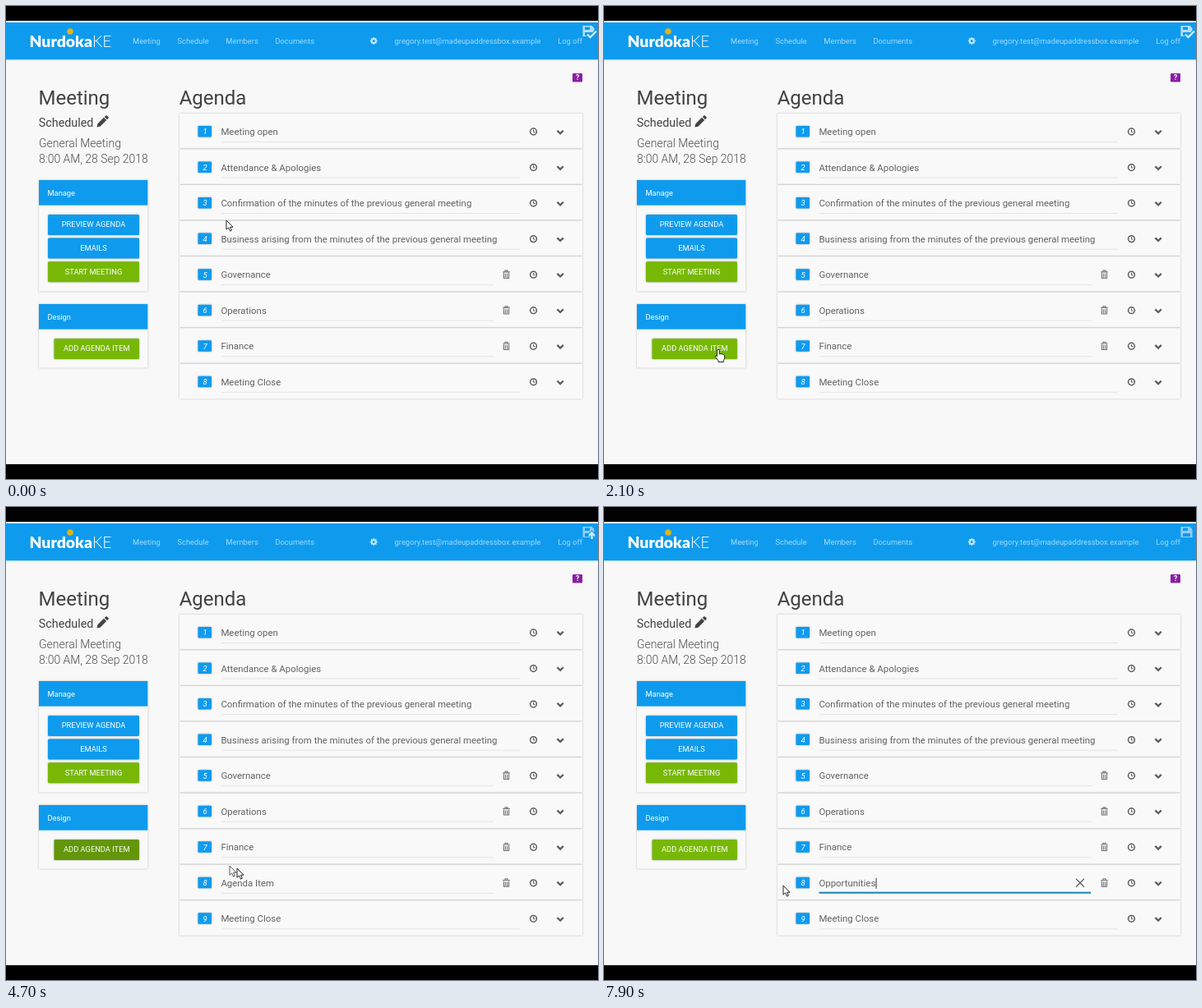
Write an HTML page that moves like this. It is 720 px wide and 576 px high and loops after 8000 ms.

```html
<!DOCTYPE html>
<html lang="en">
<head>
<meta charset="utf-8">
<style>
  html, body { margin: 0; width: 100%; height: 100%; overflow: hidden; background: #000; }
  svg { display: block; width: 720px; height: 576px; font-family: Roboto, sans-serif; }
  text { white-space: pre; }
  .nav { font-size: 9.36px; fill: #a3dafa; }
  .small { font-size: 9.3px; fill: #fff; }
  .item { font-size: 11.43px; fill: #626262; }
  .badge { font-size: 9.5px; font-style: italic; fill: #fff; text-anchor: middle; }
  .card { fill: #f9f9f9; filter: drop-shadow(0 .7px .8px rgba(0, 0, 0, .25)); }
  .raised { filter: drop-shadow(0 .8px .9px rgba(0, 0, 0, .32)); }
  .line { fill: none; stroke: #5c5c5c; stroke-width: 1.5; }
</style>
</head>
<body>
<svg id="stage" viewBox="0 0 720 576"></svg>
<script>
const BLUE = '#0e9bee', GREEN = '#77b806', DARK_GREEN = '#63960a';
const LOOP = 8000, PITCH = 43.54, FIRST_ROW = 153;
const TYPED = 'Opportunities';

const rect = (x, y, w, h, fill, extra = '') =>
  `<rect x="${x}" y="${y}" width="${w}" height="${h}" fill="${fill}" ${extra}/>`;
const text = (x, y, content, extra) => `<text x="${x}" y="${y}" ${extra}>${content}</text>`;
const heading = (x, y, size, content, weight = 400, fill = '#424242') =>
  text(x, y, content, `font-size="${size}" font-weight="${weight}" fill="${fill}"`);
const rowY = i => FIRST_ROW + PITCH * i;

const button = (x, y, w, label, fill, id = '') =>
  rect(x, y, w, 25, fill, `rx="1.5" class="raised" ${id}`) +
  text(x + w / 2, y + 15.4, label, 'class="small" text-anchor="middle"');

const panel = (y, h, title) =>
  rect(40, y, 132.3, h, '', 'class="card"') + rect(40, y, 132.3, 30.7, BLUE) +
  text(50.5, y + 18.6, title, 'class="small"');

const bin = '<path class="line" d="M604.300 -3.300h8.400M607 -3.800v-1.200h3v1.200M605.400 -2.300v6.600h6.200v-6.600M607.400 -1.500v5M609.600 -1.500v5" style="stroke:#747474;stroke-width:1.1"/>';

// One agenda row, drawn around its own centre line.
function row(number, label, removable, ids = ['', '', '']) {
  return `<g ${ids[0]} transform="translate(0 ${rowY(number - 1)})">
    ${rect(211, -22, 490, 42.3, '', 'class="card"')}
    ${rect(262, 12, removable ? 331 : 363, 1, '#e4e4e4')}
    ${rect(233.5, -7, 16.5, 13.5, BLUE, 'rx="1" class="raised"')}
    ${text(242, 3.4, number, `class="badge" ${ids[1]}`)}
    ${ids[2] ? '<g id="field"></g>' : ''}
    ${text(261.4, 4.1, label, `class="item" ${ids[2]}`)}
    ${removable ? bin : ''}
    <circle class="line" cx="641.5" cy="0" r="3.9"/>
    <path class="line" d="M641.5 -2.3v2.7h2" style="stroke-width:1"/>
    <path class="line" d="M670.4 -1.3l3.7 3.6l3.7 -3.6" style="stroke-width:2.3"/>
  </g>`;
}

const items = ['Meeting open', 'Attendance &amp; Apologies',
  'Confirmation of the minutes of the previous general meeting',
  'Business arising from the minutes of the previous general meeting',
  'Governance', 'Operations', 'Finance'];

const gear = Array.from({ length: 8 }, (_, i) =>
  `<rect x="-.9" y="-4.4" width="1.8" height="2.5" transform="rotate(${i * 45})"/>`).join('');

const stage = document.getElementById('stage');
stage.innerHTML = `
  ${rect(0, 18, 720, 540, '#f8f8f8')}
  ${rect(0, 20, 720, 45.5, BLUE)}
  ${rect(0, 65.5, 720, 1, '#dbe9f2')}
  <circle cx="78" cy="31" r="3.8" fill="#e2b318"/>
  <text x="28.5" y="50" font-family="Lato, sans-serif" font-size="19.4" font-weight="900" fill="#fff">Nurdoka<tspan
    font-weight="300">KE</tspan></text>
  ${[[154, 'Meeting'], [208.5, 'Schedule'], [267.3, 'Members'], [327.4, 'Documents'],
    [472.6, 'gregory.test@madeupaddressbox.example'], [671.2, 'Log off']]
    .map(([x, label]) => text(x, 46.3, label, 'class="nav"')).join('')}
  <g transform="translate(447.3 42.5)" fill="#c3e7fc">${gear}
    <circle r="2.4" fill="none" stroke="#c3e7fc" stroke-width="1.8"/></g>
  <path id="disk" fill-rule="evenodd" d="M701.500 24h11l3 3v10h-14zM704 25.500v3.500h6v-3.500zM704 32v4h9v-4z"/>
  <path id="diskEdge" fill="none" stroke="${BLUE}" stroke-width="4.5"/>
  <path id="diskMark" fill="none" stroke="#d3ecfc" stroke-width="2.3"/>
  ${rect(689, 82, 12, 10.5, '#8a1fa5', 'rx="1"')}
  ${text(695, 90.2, '?', 'font-size="8.5" font-weight="700" fill="#fff" text-anchor="middle"')}
  ${heading(39.5, 120, 24, 'Meeting')}
  ${heading(210.7, 120, 24, 'Agenda')}
  ${heading(39.8, 147, 14.3, 'Scheduled')}
  <path d="M110.500 147.500l.8-4l7.700-7.700l3.200 3.200l-7.700 7.700zM119.800 135l1.500-1.500q.8-.6 1.600 0l1.600 1.600q.6.8 0 1.600l-1.500 1.500z" fill="#424242"/>
  ${heading(40, 172.3, 14, 'General Meeting', 300, '#505050')}
  ${heading(40, 191.2, 13.95, '8:00 AM, 28 Sep 2018', 300, '#505050')}
  ${panel(212, 135.5, 'Manage')}
  ${button(51, 254, 111, 'PREVIEW AGENDA', BLUE)}
  ${button(51, 282.5, 111, 'EMAILS', BLUE)}
  ${button(51, 311.2, 111, 'START MEETING', GREEN)}
  ${panel(363, 77.5, 'Design')}
  ${button(58.5, 405, 103.5, 'ADD AGENDA ITEM', GREEN, 'id="add"')}
  <circle id="ripple" cx="110.3" cy="417.3" r="11" fill="#000" opacity=".35"/>
  ${items.map((label, i) => row(i + 1, label, i > 3)).join('')}
  ${row(8, 'Agenda Item', true, ['id="added"', '', 'id="label"'])}
  ${row(9, 'Meeting Close', false, ['id="last"', 'id="lastNumber"', ''])}
  ${['ghost', 'cursor'].map(id =>
    `<path id="${id}" fill="#fff" stroke="#222" stroke-width="1" stroke-linejoin="round"/>`).join('')}`;

const $ = id => document.getElementById(id);
const set = (id, name, value) => $(id).setAttribute(name, value);
const show = (id, visible) => set(id, 'visibility', visible ? 'visible' : 'hidden');

const ARROW = 'M0 0v11.200l2.600-2.300l1.900 4.200l1.900-.9l-1.900-4h3.500z';
const HAND = 'M-1.500 .8q1.500-1.500 2.800 0v5l1.800-.3l2 .5l1.700.6l.8 1.200v3.500l-1.200 2.200v2h-6.400v-1.700l-3.600-4.600q-.2-1.600 1.500-1.300l.6.7z';

// [time, x, y] of the pointer tip
const path = [[0, 268, 261], [300, 268, 261], [700, 226, 300], [1400, 142, 390], [1500, 137, 401],
  [1800, 139, 418], [2900, 139, 418], [3600, 238, 434], [3800, 238, 434], [3900, 241, 435],
  [4400, 260, 436], [4600, 272, 437], [4700, 281, 440], [5100, 289, 463], [6200, 289, 463],
  [6800, 218, 461], [LOOP, 218, 461]];

function pointerAt(t) {
  const next = Math.max(1, path.findIndex(p => p[0] >= t));
  const [t0, x0, y0] = path[next - 1], [t1, x1, y1] = path[next];
  const k = Math.max(0, (t - t0) / (t1 - t0));
  return [x0 + (x1 - x0) * k, y0 + (y1 - y0) * k];
}

function drawPointer(t) {
  const [x, y] = pointerAt(t), [gx, gy] = pointerAt(Math.max(0, t - 100));
  const shape = t >= 1700 && t < 4300 ? HAND : ARROW;
  [['cursor', x, y], ['ghost', gx, gy]].forEach(([id, px, py]) => {
    set(id, 'd', shape);
    set(id, 'transform', `translate(${px} ${py})`);
  });
  set('ghost', 'opacity', Math.hypot(x - gx, y - gy) > 1 ? .75 : 0);
}

function drawField(t) {
  const focused = t >= 5200, word = t >= 5500 && t < 6200, all = t >= 6200 && t < 6500;
  const count = Math.max(0, Math.min(TYPED.length, Math.floor((t - 6400) / 95)));
  const label = $('label');
  const part = (content, selected) => `<tspan fill="${selected ? '#fff' : '#626262'}">${content}</tspan>`;
  if (count) label.textContent = TYPED.slice(0, count);
  else label.innerHTML = part('Agenda ', word || all) + part('Item', all);
  let marks = '';
  if (focused) {
    marks = rect(261.5, 10.9, 330.5, 2, '#1685b8') +
      '<path class="line" d="M574 -5l10 10M584 -5l-10 10" style="stroke-width:1.2"/>';
    if (word || all) marks += rect(261.5, -6.8, all ? 65 : 42, 14, '#0078d0');
    else marks += rect(261.6 + label.getComputedTextLength(), -6, 1, 13, '#333');
  }
  $('field').innerHTML = marks;
}

function drawDisk(t) {
  const saving = t >= 4300 && t < 5000, edited = t >= 6500;
  set('disk', 'fill', saving || edited ? '#8fcdf5' : '#b4dff9');
  ['diskEdge', 'diskMark'].forEach(id => {
    set(id, 'd', saving ? 'M712.500 39v-7M709 35l3.500-3.500l3.500 3.500' : 'M707 34.500l3.500 3.500l7.500-7.500');
    show(id, !edited);
  });
}

function draw(t) {
  const added = t >= 4300;
  show('added', added);
  set('last', 'transform', `translate(0 ${rowY(added ? 8 : 7)})`);
  $('lastNumber').textContent = added ? 9 : 8;
  show('ripple', t >= 2300 && !added);
  set('add', 'fill', added && t < 5200 ? DARK_GREEN : GREEN);
  drawField(t);
  drawDisk(t);
  drawPointer(t);
}

const start = performance.now();
function tick(now) {
  const t = Math.max(0, now - start) % LOOP;
  draw(Math.floor(t / 100) * 100);
  requestAnimationFrame(tick);
}
draw(0);
requestAnimationFrame(tick);
</script>
</body>
</html>
```
